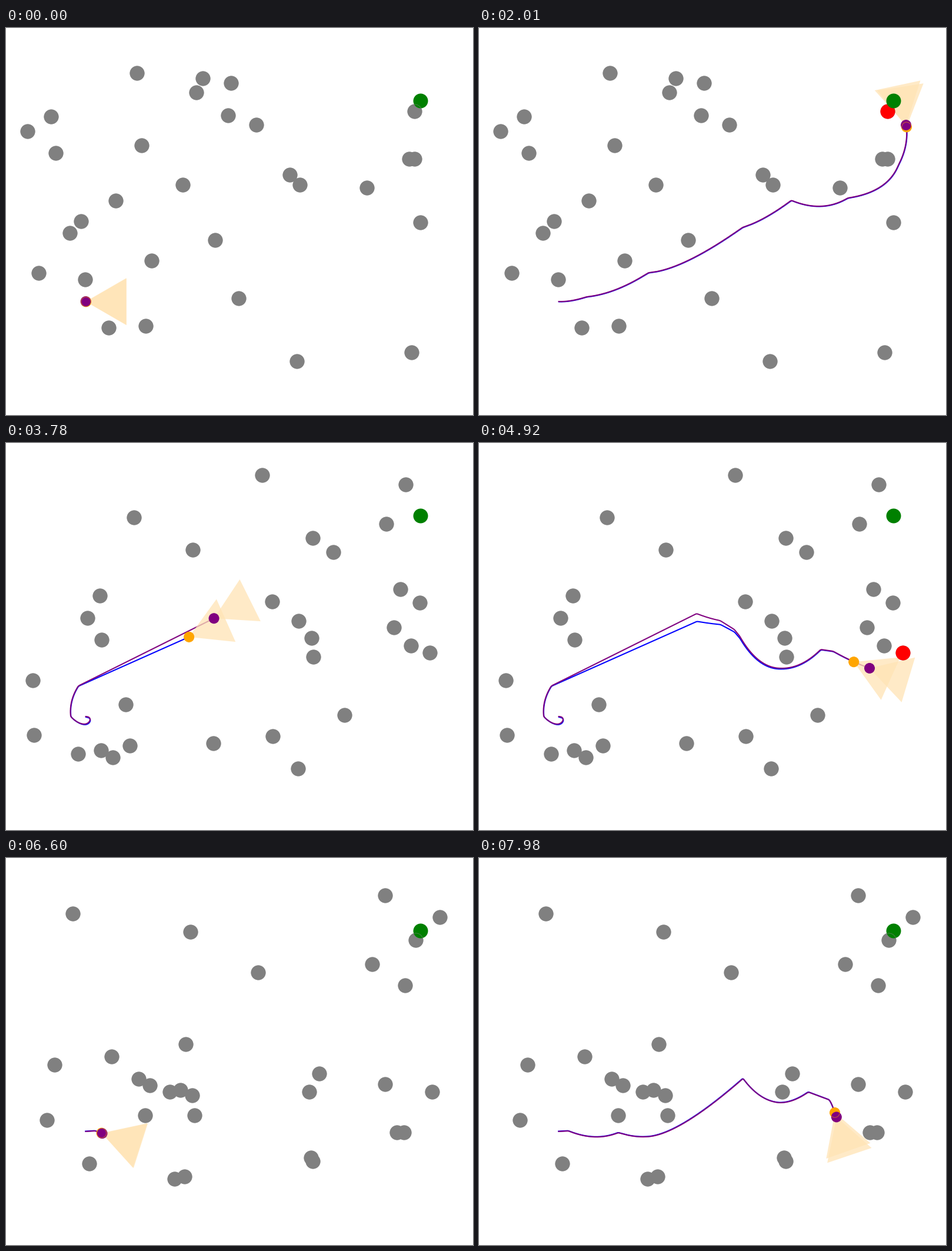
A matplotlib script for the animation above (8 s loop, 794 px wide and 658 px high).

```python
import numpy as np
import matplotlib.pyplot as plt
from matplotlib.animation import FuncAnimation
from matplotlib.collections import EllipseCollection

W, H, DPI = 794, 658, 100
LOOP, TICK, STEP = 8000, 20, 30
START, GOAL = (135, 465), (705, 124)
SIDE = 79.5                     # length of a field-of-view edge
SIGHT, SPREAD = 75, np.radians(45)

FIELD_A = [
    (223, 77), (335, 86), (324, 110), (383, 94), (378, 149), (426, 165),
    (77, 151), (37, 176), (85, 213), (231, 200), (301, 267), (187, 294),
    (128, 329), (109, 349), (56, 417), (135, 428), (248, 396), (356, 361),
    (396, 460), (238, 507), (175, 510), (495, 567), (690, 552), (705, 331),
    (614, 272), (483, 250), (500, 267), (686, 223), (695, 223), (695, 142)]
FIELD_B = [
    (436, 55), (680, 71), (647, 138), (218, 127), (318, 182), (522, 162),
    (557, 186), (160, 260), (139, 298), (163, 335), (453, 270), (498, 303),
    (520, 332), (523, 364), (671, 249), (704, 272), (660, 314), (689, 345),
    (721, 357), (46, 404), (48, 497), (204, 445), (123, 529), (162, 523),
    (182, 535), (211, 515), (353, 511), (454, 499), (497, 554), (576, 463)]
FIELD_C = [
    (114, 95), (314, 126), (429, 195), (645, 64), (738, 101), (697, 140),
    (623, 181), (679, 217), (306, 317), (180, 338), (83, 352), (226, 376),
    (245, 387), (279, 398), (297, 395), (317, 404), (237, 438), (321, 438),
    (70, 446), (142, 520), (287, 546), (304, 542), (533, 367), (516, 398),
    (645, 385), (725, 398), (665, 467), (677, 467), (519, 510), (522, 516)]

# A bend is the end of a straight line, or the control and end of a curve.
BENDS_A = [
    (155, 466, 183, 457), (232, 452, 288, 416), (345, 412, 448, 339),
    (484, 328, 531, 293), (584, 315, 627, 289), (695, 279, 713, 233),
    (729, 203, 727, 172), (726, 157, 717, 145)]
BENDS_B = [
    (144, 465, 143, 471), (141, 477, 134, 478), (122, 478, 110, 465),
    (107, 438, 123, 413), (370, 290), (390, 298, 410, 302), (434, 317),
    (443, 328), (474, 383, 513, 383), (548, 384, 581, 351), (602, 354),
    (632, 371, 664, 383), (694, 391, 703, 376), (711, 340, 707, 308),
    (724, 290, 730, 258), (739, 225, 734, 197), (731, 158, 711, 136)]
BENDS_C = [
    (152, 464), (198, 483, 237, 467), (262, 475, 283, 474),
    (336, 474, 449, 375), (477, 413, 510, 416), (533, 417, 560, 398),
    (595, 411), (599, 414, 608, 441)]

# (time since the run began, bend number plus fraction of its length)
KEYS_A = [(0, 0), (780, 3.6), (900, 4.07), (1140, 5), (1620, 6.4),
          (2010, 7.37), (2460, 8)]
KEYS_B = [(0, 0), (750, 2.9), (870, 4), (1320, 5), (1620, 8), (2430, 12),
          (3180, 16.35), (3990, 17)]
KEYS_B_LATE = [(0, 0), (750, 2.45), (900, 4), (1290, 4.76), (1410, 5),
               (1560, 6.05), (1680, 8), (2370, 11.4), (2430, 11.57),
               (3180, 16), (3990, 17)]
KEYS_C = [(0, 0), (60, 1.14), (750, 4.05), (1440, 8)]


def drift(x):
    """Sideways error that builds up on the long straight, then fades."""
    return 13 * np.clip((x - 123) / 247, 0, 1) * np.exp(-np.maximum(x - 370, 0) / 55)


class Runner:
    def __init__(self, bends, keys, lag=0.0, shift=0.0, drifts=False):
        u = np.linspace(0, 1, 41)[1:, None]
        p, parts = np.array(START, float), [[START]]
        for b in bends:
            q = np.array(b[-2:], float)
            c = np.array(b[:2]) if len(b) == 4 else (p + q) / 2
            parts.append((1 - u) ** 2 * p + 2 * u * (1 - u) * c + u ** 2 * q)
            p = q
        raw = np.vstack(parts) + shift
        if drifts:
            raw[:, 1] += drift(raw[:, 0])
        s = np.concatenate([[0], np.cumsum(np.hypot(*np.diff(raw, axis=0).T))])

        # even spacing, corners slightly rounded
        self.s = np.linspace(0, s[-1], int(s[-1]) + 1)
        even = [np.interp(self.s, s, raw[:, k]) for k in (0, 1)]
        box = np.ones(5) / 5
        self.pts = np.column_stack(
            [np.convolve(np.pad(v, 2, mode="edge"), box, "valid") for v in even])

        ends = s[::40]
        times, marks = np.array(keys, float).T
        self.times = times * (1 + lag)
        self.marks = np.interp(marks, np.arange(len(ends)), ends)

    def at(self, s):
        return np.array([np.interp(s, self.s, self.pts[:, k]) for k in (0, 1)])

    def pose(self, t):
        s = np.interp(t, self.times, self.marks)
        pos, heading = self.at(s), 0.0
        if s > 0:
            dx, dy = self.at(s + 3) - self.at(s - 2)
            heading = np.arctan2(dy, dx)
        return pos, heading, np.vstack([self.pts[self.s < s], pos])


# (start time, obstacles, leader, follower)
RUNS = [
    (0, FIELD_A, Runner(BENDS_A, KEYS_A),
     Runner(BENDS_A, KEYS_A, 0.012, 0.4)),
    (2490, FIELD_B, Runner(BENDS_B, KEYS_B),
     Runner(BENDS_B, KEYS_B_LATE, 0, 0.4, True)),
    (6540, FIELD_C, Runner(BENDS_C, KEYS_C),
     Runner(BENDS_C, KEYS_C, 0.02, -0.4)),
]

fig = plt.figure(figsize=(W / DPI, H / DPI), dpi=DPI, facecolor="white")
ax = fig.add_axes([0, 0, 1, 1])
ax.set_xlim(0, W)
ax.set_ylim(H, 0)
ax.axis("off")


def discs(r, z, **style):
    c = EllipseCollection([2 * r], [2 * r], [0], units="xy", zorder=z,
                          offsets=[START], offset_transform=ax.transData,
                          **style)
    ax.add_collection(c, autolim=False)
    return c


def dot(r, z, color):
    return discs(r, z, facecolors=color, edgecolors="none")


def ring(r, z, color):
    return discs(r, z, facecolors="none", edgecolors=color,
                 linewidths=0.7, alpha=0.6)


blue_line, = ax.plot([], [], color="blue", lw=1.5, zorder=1)
purple_line, = ax.plot([], [], color="purple", lw=1.5, zorder=2)
views = [ax.fill([0, 0, 0], [0, 0, 0], color="moccasin", alpha=0.75,
                 lw=0, zorder=3)[0] for _ in range(2)]
gray = dot(12.5, 4, "gray")
red = dot(12.5, 5, "red")
dot(12.5, 6, "green").set_offsets([GOAL])
follower_dot = dot(9, 7, "orange")
leader_dot = dot(9, 8, "purple")
gray_rings = ring(12.1, 9, "gray")
follower_ring = ring(8.2, 10, "orange")


def cone(pos, heading):
    a = heading + np.radians([-30, 30])
    tips = pos + SIDE * np.column_stack([np.cos(a), np.sin(a)])
    return np.vstack([pos, tips])


def seen(obstacles, pos, heading):
    dx, dy = (obstacles - pos).T
    turn = np.angle(np.exp(1j * (np.arctan2(dy, dx) - heading)))
    return (np.hypot(dx, dy) < SIGHT) & (np.abs(turn) < SPREAD)


def draw(i):
    t = i * TICK // STEP * STEP
    start, field, leader, follower = [r for r in RUNS if r[0] <= t][-1]
    field = np.array(field, float)
    pos, heading, trail = leader.pose(t - start)
    pos2, heading2, trail2 = follower.pose(t - start)

    purple_line.set_data(*trail.T)
    blue_line.set_data(*trail2.T)
    views[0].set_xy(cone(pos2, heading2))
    views[1].set_xy(cone(pos, heading))
    leader_dot.set_offsets([pos])
    follower_dot.set_offsets([pos2])
    follower_ring.set_offsets([pos2])

    hit = seen(field, pos, heading)
    gray.set_offsets(field)
    gray_rings.set_offsets(field[~hit])
    red.set_visible(bool(hit.any()))
    if hit.any():
        red.set_offsets(field[hit])
    return []


anim = FuncAnimation(fig, draw, frames=LOOP // TICK, interval=TICK,
                     init_func=lambda: draw(0), repeat=True, repeat_delay=0,
                     blit=False)
plt.show()
```
